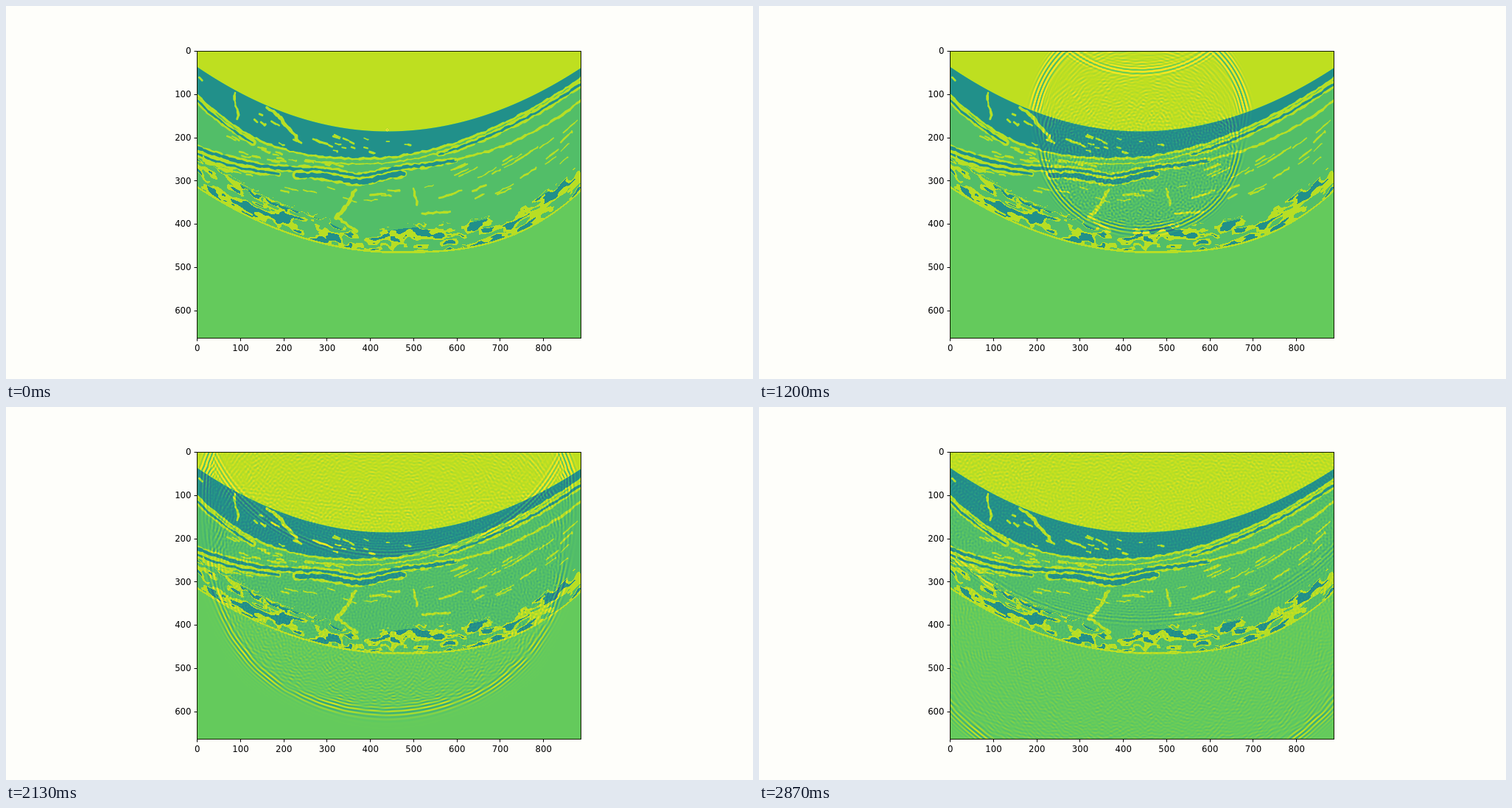
Write an HTML page with a canvas that moves like this. It is 1014 px wide and 507 px high and loops after 3010 ms.

```html
<!DOCTYPE html>
<html lang="en">
<head>
<meta charset="utf-8">
<title>Wave propagation</title>
<style>
  html, body { margin: 0; width: 100%; height: 100%; overflow: hidden; background: #fefefa; }
  canvas { position: absolute; left: 260px; top: 61px; }
  svg { position: absolute; left: 0; top: 0; font: 11.7px "DejaVu Sans", Verdana, sans-serif; }
</style>
</head>
<body>
<canvas id="plot" width="521" height="390"></canvas>
<svg id="axes" width="1014" height="507" viewBox="0 0 1014 507"></svg>
<script>
const W = 521, H = 390, X0 = 260, Y0 = 61, X1 = X0 + W;
const LOOP = 3010, LAST = 19, STEPS = 32;
const DARK = 0.5, MID = 0.7, BASE = 0.76, VEIN = 0.89, TOP = 0.9;

// Seeded helpers
let seed = 7;
const rnd = () => {
  seed = (seed + 0x6D2B79F5) | 0;
  let t = Math.imul(seed ^ (seed >>> 15), 1 | seed);
  t = (t + Math.imul(t ^ (t >>> 7), 61 | t)) ^ t;
  return ((t ^ (t >>> 14)) >>> 0) / 4294967296;
};
const span = (a, b) => a + (b - a) * rnd();
const lattice = Float32Array.from({ length: 4096 }, rnd);
const cell = (x, y) => lattice[(x * 73 + y * 1031) & 4095];
const ease = t => t * t * (3 - 2 * t);
const mix = (a, b, t) => a + (b - a) * t;
const clamp = (v, a, b) => Math.max(a, Math.min(b, v));
const bump = (x, mid, width) => Math.exp(-(((x - mid) / width) ** 2));
function noise(x, y) {
  const i = Math.floor(x), j = Math.floor(y), a = ease(x - i);
  return mix(mix(cell(i, j), cell(i + 1, j), a), mix(cell(i, j + 1), cell(i + 1, j + 1), a), ease(y - j));
}

// Curve that is lowest at mid and rises by a power law to each side
const bowl = (mid, low, left, powL, right, powR) => x => x < mid
  ? low - left * ((mid - x) / (mid - X0)) ** powL
  : low - right * ((x - mid) / (X1 - mid)) ** powR;
const surface = bowl(517, 170.5, 87, 2, 87, 2);
const darkEdge = bowl(490, 207.5, 86, 2.7, 110, 1.85);
const bottom = bowl(530, 335.5, 88, 2, 84.5, 2.75);
const sag = bowl(420, 222, 29, 2.3, 94, 3.1);
const middle = x => sag(x) + 9 * bump(x, 480, 35);
const mottle = x => 36 - 13 * bump(x, 480, 40) + 9 * bump(x, X0, 60);
const shift = (f, d) => x => f(x) + d;

// Layered map of the medium, drawn as grey levels
function buildMap() {
  const c = document.createElement('canvas');
  c.width = W; c.height = H;
  const g = c.getContext('2d', { willReadFrequently: true });
  const grey = v => { const k = Math.round(v * 250); return `rgb(${k},${k},${k})`; };
  g.translate(-X0, -Y0);
  g.lineCap = 'round';
  const column = (x, y, v) => { g.fillStyle = grey(v); g.fillRect(x, y, 1, 500 - y); };
  for (let x = X0; x < X1; x++) {
    column(x, Y0, TOP);
    column(x, surface(x), DARK);
    column(x, darkEdge(x), MID);
    column(x, bottom(x), BASE);
  }

  const segment = (x, y, nx, ny, width, level) => {
    g.strokeStyle = grey(level);
    g.lineWidth = width * span(0.7, 1.3);
    g.beginPath(); g.moveTo(x, y); g.lineTo(nx, ny); g.stroke();
  };
  const follow = (f, a, b, width, level) => {
    let x = a, y = f(clamp(a, X0, X1));
    while (x < b) {
      const nx = Math.min(b, x + 5), ny = f(clamp(nx, X0, X1)) + span(-1, 1);
      segment(x, y, nx, ny, width, level);
      x = nx; y = ny;
    }
  };
  const strand = (f, a, b, width) => { follow(f, a, b, width + 5, VEIN); follow(f, a, b, width, DARK); };
  const crack = (x, y, nx, ny, width) => {
    const n = Math.ceil(Math.hypot(nx - x, ny - y) / 5);
    const at = k => [mix(x, nx, k / n) + span(-2, 2), mix(y, ny, k / n) + span(-1, 1)];
    let p = [x, y];
    for (let k = 1; k <= n; k++) {
      const q = at(k);
      segment(...p, ...q, width, VEIN);
      p = q;
    }
  };
  // Short strokes lying along the layers between two curves
  const dashes = (n, a, b, upper, lower, size, width, tilt) => {
    while (n--) {
      const x = span(a, b), f = rnd(), t = tilt * span(0.7, 1.3);
      follow(u => mix(upper(u), lower(u), f) + t * (u - x), x, x + size * span(0.4, 1), width * span(0.7, 1.2), VEIN);
    }
  };

  follow(darkEdge, X0, X1, 3, VEIN);
  strand(shift(darkEdge, 7), X0, 335, 2.5);
  strand(shift(darkEdge, 8), 588, X1, 3);
  follow(shift(darkEdge, 7), 430, 600, 2, VEIN);
  strand(shift(middle, 8), X0, 370, 3);
  strand(middle, X0, 610, 4);
  strand(shift(middle, 8), 395, 540, 6);
  follow(middle, 610, X1, 3, VEIN);

  // Veins and the cleft
  crack(311, 118, 314, 153, 3);
  crack(354, 138, 369, 148, 4);
  crack(369, 148, 401, 187, 4);
  crack(417, 181, 443, 191, 3);
  crack(475, 250, 450, 288, 5);
  crack(450, 288, 476, 306, 4);
  crack(553, 248, 557, 270, 3);
  crack(565, 282, 604, 280, 3);
  dashes(22, 262, 545, shift(surface, 6), shift(darkEdge, -6), 9, 2.5, 0.2);
  dashes(28, 290, 450, shift(darkEdge, 7), shift(middle, -8), 14, 2.2, 0);
  dashes(9, 370, 530, shift(middle, 22), shift(middle, 34), 24, 2.4, 0.2);
  dashes(10, 555, 655, shift(middle, 12), shift(bottom, -60), 26, 2.2, -0.2);
  dashes(16, 660, 765, shift(middle, 16), shift(bottom, -60), 26, 2, -0.15);
  dashes(9, X0, 330, shift(middle, 12), shift(middle, 18), 16, 3, 0);

  const px = g.getImageData(0, 0, W, H).data;
  const map = Float32Array.from({ length: W * H }, (_, i) => px[4 * i] / 250);

  // Mottled streaks along the lower boundary
  for (let x = 0; x < W; x++) {
    const b = bottom(x + X0) - Y0, th = mottle(x + X0);
    for (let y = Math.floor(b - th - 8); y < b; y++) {
      const d = b - y, i = y * W + x;
      const fade = clamp((th + 6 - d) / 14, 0, 1);
      const n = 0.78 * noise(x / 17 + 3, d / 5.2 + 2 * noise(x / 11, d / 9 + 40)) + 0.22 * noise(x / 6, d / 3 + 90);
      if (d < 2.6) map[i] = VEIN;
      else if (n > 0.62) { if (fade > 0.5) map[i] = DARK; }
      else if (n > 0.62 - 0.22 * fade) map[i] = VEIN;
    }
  }
  return map;
}

// Value to colour
const stops = [[0.25, 59, 82, 139], [0.5, 33, 144, 138], [0.75, 94, 201, 96], [0.9, 190, 223, 32], [1, 253, 231, 37]];
const ramp = Uint32Array.from({ length: 512 }, (_, i) => {
  const v = mix(0.25, 1, i / 511);
  const k = Math.max(1, stops.findIndex(s => s[0] >= v - 1e-9));
  const a = stops[k - 1], b = stops[k], t = (v - a[0]) / (b[0] - a[0]);
  const [r, g, bl] = [1, 2, 3].map(j => Math.round(mix(a[j], b[j], t)));
  return (255 << 24 | bl << 16 | g << 8 | r) >>> 0;
});
const colour = v => ramp[Math.round(clamp((v - 0.25) / 0.75, 0, 1) * 511)];

// Acoustic wave on a padded grid; the pads absorb, the thin upper one only in part
const PAD = 24, LID = 6, GW = W + 2 * PAD, GH = H + LID + PAD;
const SX = 257 + PAD, SY = 107 + LID, COURANT = 0.583;
const map = buildMap();
const speed2 = new Float32Array(GW * GH), keep = new Float32Array(GW * GH);
for (let gy = 0; gy < GH; gy++) {
  for (let gx = 0; gx < GW; gx++) {
    const x = clamp(gx - PAD, 0, W - 1), y = clamp(gy - LID, 0, H - 1), i = gy * GW + gx;
    const depth = y + Y0 - surface(x + X0);
    const tissue = depth > 0 && y + Y0 < bottom(x + X0);
    const grain = !tissue ? 1 : depth < 1 ? 0.72 : span(0.86, 1.08);
    speed2[i] = grain * (COURANT * (0.88 + 0.133 * map[y * W + x])) ** 2;
    const out = Math.max(PAD - gx, gx - PAD - W + 1, gy - LID - H + 1, 0) / PAD;
    keep[i] = 1 - 0.12 * out * out - (gy < LID ? 0.035 : 0);
  }
}
let now = new Float32Array(GW * GH), old = new Float32Array(GW * GH), step = 0;

function advance() {
  const reach = Math.ceil(step * 0.7) + 8;
  const xa = Math.max(2, SX - reach), xb = Math.min(GW - 2, SX + reach);
  const ya = Math.max(2, SY - reach), yb = Math.min(GH - 2, SY + reach);
  for (let y = ya; y < yb; y++) {
    for (let i = y * GW + xa, end = y * GW + xb; i < end; i++) {
      const near = now[i - 1] + now[i + 1] + now[i - GW] + now[i + GW];
      const far = now[i - 2] + now[i + 2] + now[i - 2 * GW] + now[i + 2 * GW];
      const pull = speed2[i] * ((16 * near - far) / 12 - 5 * now[i]);
      old[i] = keep[i] * (2 * now[i] - keep[i] * old[i] + pull);
    }
  }
  const t = step - 14;
  old[SY * GW + SX] += 8 * Math.exp(-t * t / 110) * Math.sin(t * 2 * Math.PI / 8.2);
  [now, old] = [old, now];
  step++;
}

const shots = [];
function shot(index) {
  while (shots.length <= index) {
    while (step < shots.length * STEPS + 3) advance();
    const image = new ImageData(W, H), out = new Uint32Array(image.data.buffer);
    for (let y = 0; y < H; y++) {
      for (let x = 0; x < W; x++) {
        const wave = now[(y + LID) * GW + x + PAD];
        out[y * W + x] = colour(map[y * W + x] + 0.22 * Math.tanh(5 * wave));
      }
    }
    shots.push(image);
  }
  return shots[index];
}

// Axes
const line = (x1, y1, x2, y2) => `<path d="M${x1} ${y1}L${x2} ${y2}" stroke="#000"/>`;
const label = (x, y, anchor, s) => `<text x="${x}" y="${y}" text-anchor="${anchor}">${s}</text>`;
let svg = '<rect x="259.5" y="61.5" width="521" height="390" fill="none" stroke="#111800"/>';
for (let v = 0; v <= 800; v += 100) {
  const d = v * 0.5876, x = Math.round(259 + d) + 0.5, y = Math.round(61 + d) + 0.5;
  svg += line(x, 452, x, 455.5) + label(259.7 + d, 468.8, 'middle', v);
  if (v <= 600) svg += line(255.5, y, 259, y) + label(251.5, 65.4 + d, 'end', v);
}
document.getElementById('axes').innerHTML = svg;

// Four uneven holds in every 600 ms
const view = document.getElementById('plot').getContext('2d');
const beats = [0, 130, 330, 470];
let shown = -1;
function draw() {
  const t = performance.now() % LOOP;
  const index = Math.min(LAST, Math.floor(t / 600) * 4 + beats.filter(b => b <= t % 600).length - 1);
  if (index !== shown) view.putImageData(shot(shown = index), 0, 0);
  requestAnimationFrame(draw);
}
draw();
</script>
</body>
</html>
```
